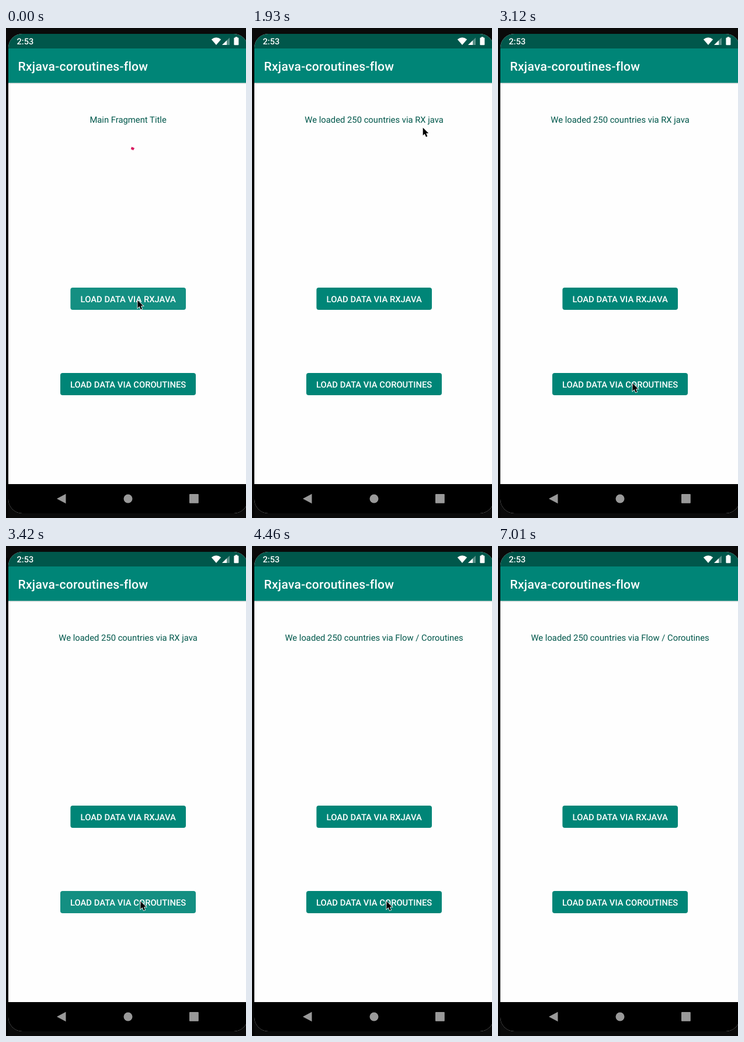
Write an HTML page that moves like this. It is 411 px wide and 838 px high and loops after 8060 ms.

```html
<!DOCTYPE html>
<html lang="en">
<head>
<meta charset="utf-8">
<title>Loading demo</title>
<style>
  html, body { margin: 0; width: 100%; height: 100%; overflow: hidden; background: #0a0a0a; }
  svg { display: block; width: 100%; height: 100%; }
  text { font: 400 14.8px Roboto, sans-serif; text-rendering: geometricPrecision; }
  .mid { text-anchor: middle; }
  .medium { font-weight: 500; fill: #fff; }
  .title { font-size: 21.14px; letter-spacing: .0125em; }
  .clock { font-size: 14.6px; }
  .button { fill: #008577; }
  .glow { fill: #fff; fill-opacity: 0; }
</style>
</head>
<body>
<svg viewBox="0 0 411 838">
  <defs>
    <clipPath id="screen"><rect x="4" y="10" width="410" height="820" rx="24"/></clipPath>
    <linearGradient id="shade" x2="0" y2="1">
      <stop stop-color="#000" stop-opacity=".18"/>
      <stop offset="1" stop-color="#000" stop-opacity="0"/>
    </linearGradient>
  </defs>

  <rect width="411" height="838" fill="#0a0a0a"/>
  <rect y="20" width="4" height="818" fill="#040404"/>
  <g clip-path="url(#screen)">
    <rect x="4" y="10" width="410" height="820" fill="#fefefe"/>
    <rect x="4" y="10" width="410" height="25" fill="#00574b"/>
    <rect x="4" y="35" width="410" height="58.8" fill="#008577"/>
    <rect x="4" y="93.8" width="410" height="2.5" fill="url(#shade)"/>
    <rect x="4" y="780" width="410" height="50" fill="#000"/>
  </g>

  <text class="medium clock" x="18.5" y="28.2">2:53</text>
  <g fill="#fff">
    <path d="M351.8 19.6Q360 13 368.2 19.6L360 29Z"/>
    <path d="M370 29L383 16.5V29Z" opacity=".35"/>
    <path d="M370 29L378 21.3V29Z"/>
    <path d="M392.6 16V15.2H396.2V16.4H397.4Q398.4 16.4 398.4 17.4V28.2Q398.4 29.2 397.4 29.2H391.4Q390.4 29.2 390.4 28.2V17.4Q390.4 16.4 391.4 16.4H392.6Z"/>
  </g>
  <text class="medium title" x="20.5" y="73">Rxjava-coroutines-flow</text>

  <text id="message" class="mid" x="209.1" y="162" fill="#00574b"></text>
  <circle id="spinner" cx="209" cy="223.3" r="18.8" pathLength="360" fill="none" stroke="#d81b60" stroke-width="4.2"/>

  <rect class="button" x="110.4" y="444" width="197.6" height="38" rx="4"/>
  <rect class="glow" x="110.4" y="444" width="197.6" height="38" rx="4"/>
  <text class="mid medium" x="209.2" y="468.7">LOAD DATA VIA RXJAVA</text>
  <rect class="button" x="93" y="590" width="232" height="38" rx="4"/>
  <rect class="glow" x="93" y="590" width="232" height="38" rx="4"/>
  <text class="mid medium" x="209.1" y="614.7">LOAD DATA VIA COROUTINES</text>

  <g fill="#999">
    <path d="M87 805L102.5 796.8V813.2Z"/>
    <circle cx="209" cy="805" r="7.5"/>
    <rect x="314" y="797" width="15.8" height="15.8" rx="1"/>
  </g>

  <path id="cursor" d="M1 1.2V14.6L4.1 11.7L6.3 16.9L8.7 15.9L6.5 10.8H10.6Z" fill="#000" stroke="#fff" stroke-width="1.6" paint-order="stroke"/>
</svg>

<script>
const LOOP = 8060;
const REFRESH = 149;

// The screen refreshes only during these spans.
const bursts = [[140, 740], [1640, 2520], [2820, 3120], [3420, 4460], [6560, 7010]];

const loads = [
  { start: -95, end: 740, message: 'We loaded 250 countries via RX java' },
  { start: 3560, end: 4460, message: 'We loaded 250 countries via Flow / Coroutines' }
];

const cursorHome = { x: 224.4, y: 464.4 };
const cursorMoves = [
  { start: 1490, end: 2080, x: 304, y: 162 },
  { start: 2080, end: 2520, x: 211, y: 564 },
  { start: 2670, end: 3120, x: 229.4, y: 606.4 },
  { start: 6410, end: 6860, x: 356, y: 810 }
];
const cursorExit = 7010;

const message = document.getElementById('message');
const spinner = document.getElementById('spinner');
const cursor = document.getElementById('cursor');
const glows = document.querySelectorAll('.glow');

const clamp = v => Math.min(1, Math.max(0, v));
const smooth = v => v * v * (3 - 2 * v);
const show = (node, visible) => { node.style.display = visible ? '' : 'none'; };

function snap(time) {
  const burst = bursts.filter(([from]) => from <= time).pop();
  if (!burst) return 0;
  const [from, to] = burst;
  const step = (to - from) / Math.round((to - from) / REFRESH);
  return from + Math.floor((Math.min(time, to) - from + 5) / step) * step;
}

// Bezier (0,0) (.2,0) (.1,1) (.5,1), held flat outside.
function trim(x) {
  if (x <= 0) return 0;
  if (x >= .5) return 1;
  let low = 0, high = 1;
  for (let i = 0; i < 24; i++) {
    const s = (low + high) / 2, r = 1 - s;
    if (.6 * s * r * r + .3 * s * s * r + .5 * s ** 3 < x) low = s; else high = s;
  }
  return smooth(low);
}

function drawSpinner(t) {
  const load = loads.find(({ start, end }) => t >= start && t < end - 1);
  show(spinner, load);
  if (!load) return;
  const age = t - load.start;
  const phase = age / 1333 % 1;
  const tail = 270 * trim(phase - .5);
  const head = 270 * trim(phase);
  const turn = age / 6665 * 720 + phase * 90 + tail - 90;
  spinner.setAttribute('stroke-dasharray', `${head - tail} 360`);
  spinner.setAttribute('transform', `rotate(${turn} 209 223.3)`);
}

// Height settles sooner than width, which bends the path.
function drawCursor(t) {
  let { x, y } = cursorHome;
  for (const move of cursorMoves) {
    const p = smooth(clamp((t - move.start) / (move.end - move.start)));
    x += (move.x - x) * p;
    y += (move.y - y) * (1 - (1 - p) ** 2);
  }
  cursor.setAttribute('transform', `translate(${x} ${y})`);
  show(cursor, t < cursorExit - 1);
}

// A pressed button lights up just before its load and fades soon after.
function drawGlow(t) {
  loads.forEach(({ start }, i) => {
    const age = t - start;
    glows[i].style.fillOpacity = age < -140 ? 0 : .08 * clamp((240 - age) / 145);
  });
}

function draw(now) {
  const t = snap(now % LOOP);
  const done = loads.filter(({ end }) => t >= end - 1).pop();
  message.textContent = done ? done.message : 'Main Fragment Title';
  drawSpinner(t);
  drawGlow(t);
  drawCursor(t);
}

const start = performance.now();
function tick() {
  draw(performance.now() - start);
  requestAnimationFrame(tick);
}
tick();
</script>
</body>
</html>
```
